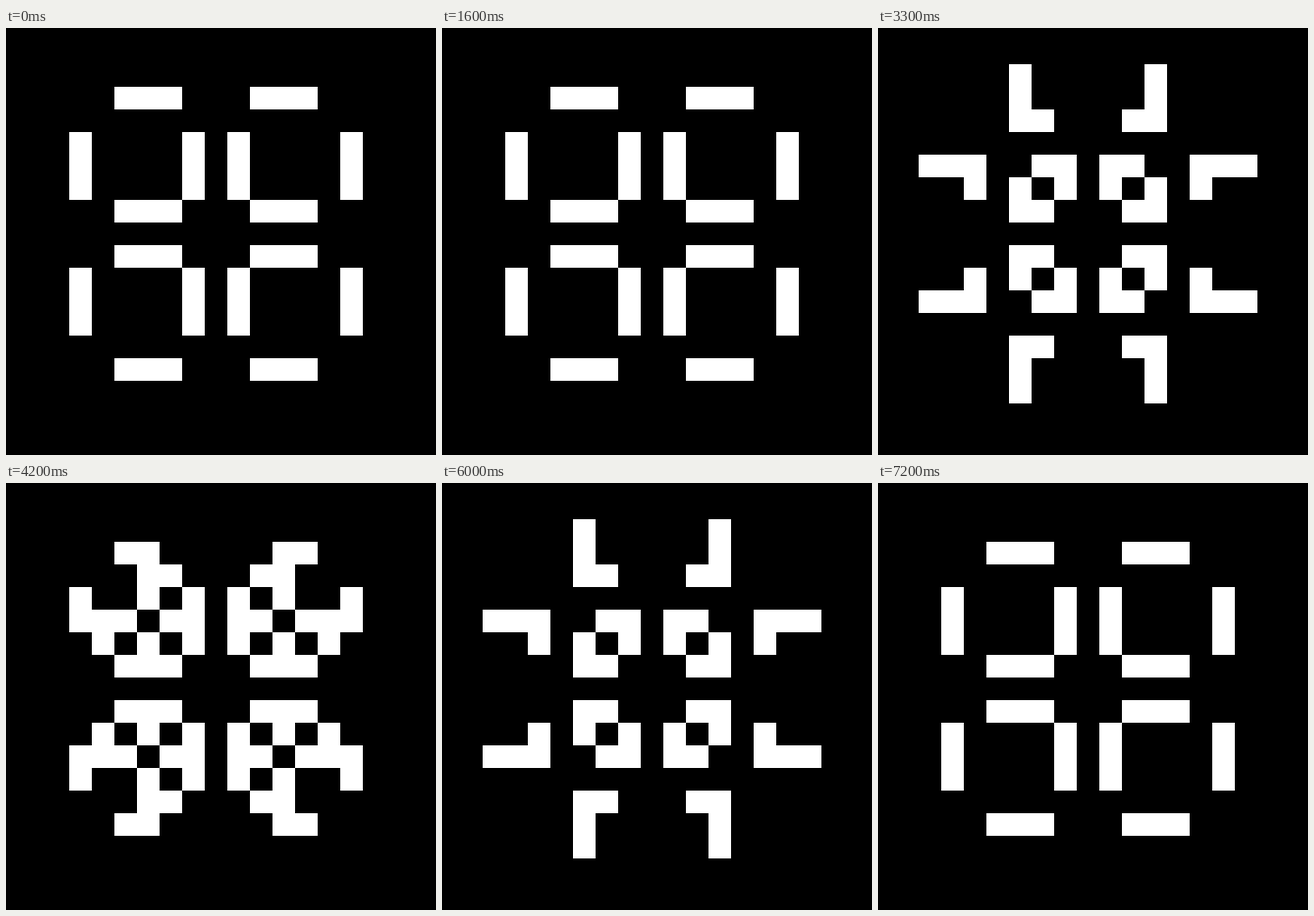
An HTML page without scripts that plays this animation: 476x472 px, repeating every 7.4 s.

```html
<!DOCTYPE html>
<html lang="en">
<head>
<meta charset="utf-8">
<title>Pulsar</title>
<style>
  @property --gen { syntax: "<number>"; inherits: true; initial-value: 0; }

  html, body { margin: 0; width: 100%; height: 100%; overflow: hidden; background: #000; }

  /* One generation every 235 ms after a 104 ms lead, sampled ten times a second. */
  svg { display: block; animation: evolve 7.4s steps(74) infinite; }
  @keyframes evolve {
    from { --gen: calc(-104 / 235); }
    to { --gen: calc((7400 - 104) / 235); }
  }

  /* Only the path whose index equals the generation modulo 3 is visible. */
  path {
    --now: mod(round(down, max(0, var(--gen)), 1), 3);
    fill: none;
    stroke: #fff;
    stroke-width: 1;
    shape-rendering: crispEdges;
    opacity: calc(1 - max(var(--now) - var(--i), var(--i) - var(--now)));
  }
</style>
</head>
<body>
<svg width="476" height="472" viewBox="0 0 476 472">
  <defs>
    <!-- One eighth of the pattern in cell units, unfolded by three mirrors. -->
    <g id="wedge">
      <path style="--i: 0" d="M3 1.5h3M6.5 3v3"/>
      <path style="--i: 1" d="M4.5 0v3M5 2.5h1M5 4.5h2M6.5 5v1"/>
      <path style="--i: 2" d="M3 1.5h2M4 2.5h2M4 3.5h1M6 3.5h1M5 4.5h2M6 5.5h1"/>
    </g>
    <g id="quarter">
      <use href="#wedge"/>
      <use href="#wedge" transform="matrix(0 1 1 0 0 0)"/>
    </g>
    <g id="half">
      <use href="#quarter"/>
      <use href="#quarter" transform="translate(15 0) scale(-1 1)"/>
    </g>
  </defs>
  <rect width="476" height="472"/>
  <g transform="translate(45 40) scale(25)">
    <use href="#half"/>
    <use href="#half" transform="translate(0 15) scale(1 -1)"/>
  </g>
</svg>
</body>
</html>
```
